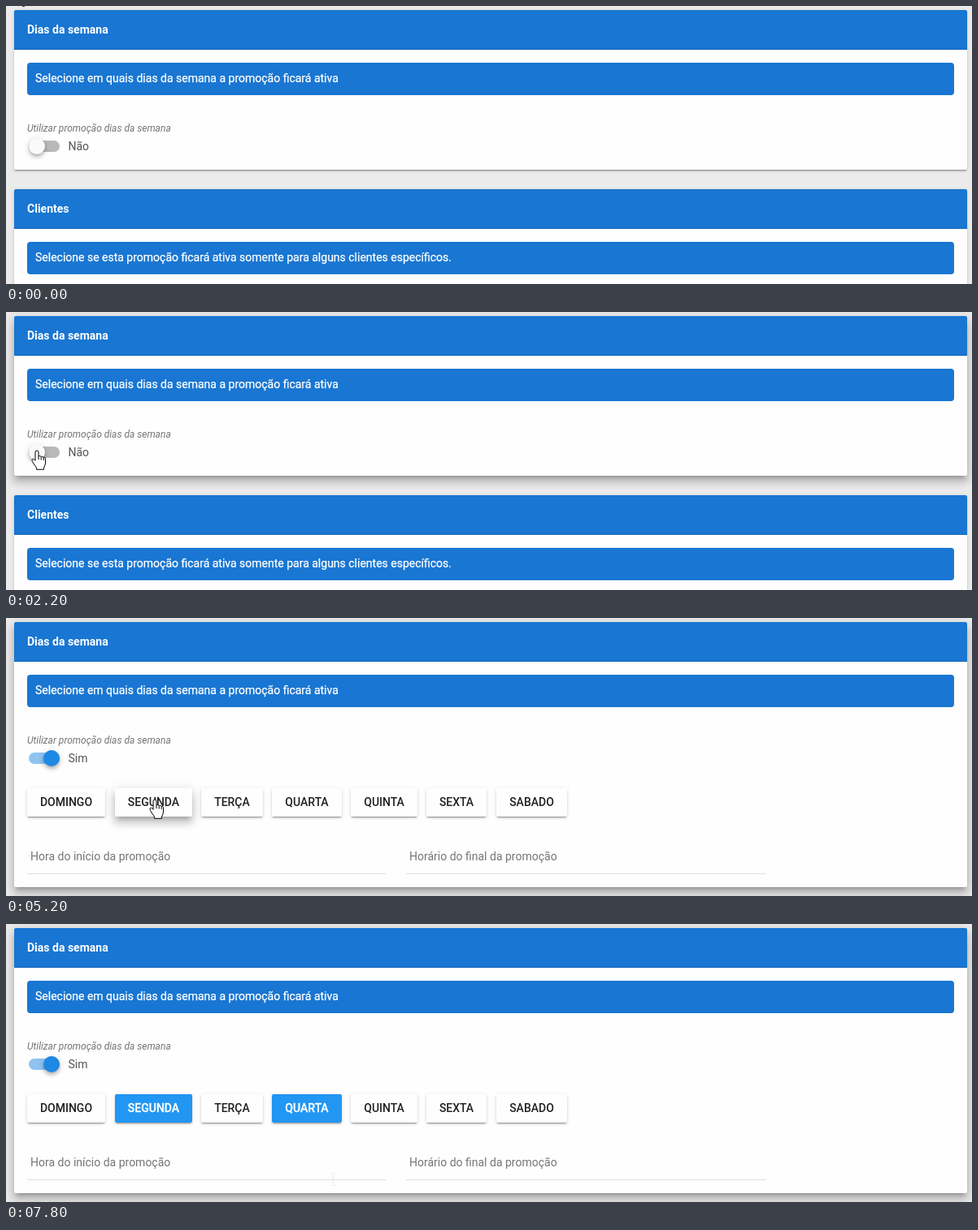
Write an HTML page that moves like this. It is 1188 px wide and 343 px high and loops after 8 s.

```html
<!DOCTYPE html>
<html lang="pt-BR">
<head>
<meta charset="utf-8">
<title>Dias da semana</title>
<style>
html, body { margin: 0; width: 100%; height: 100%; overflow: hidden; background: #ebebeb; }
#stage { position: relative; width: 1188px; height: 343px; overflow: hidden; background: #ebebeb; font: 14px/20px Roboto, Arial, sans-serif; color: #757575; }
#stage div, #stage span { position: absolute; white-space: nowrap; box-sizing: border-box; }
.card { left: 10px; width: 1172px; background: #fefefe; border-radius: 2px; }
.head { left: 0; top: 0; width: 100%; height: 49px; padding: 14px 16px; background: #1976d2; color: #fff; font-weight: 700; border-radius: 2px 2px 0 0; box-shadow: inset 0 -1px rgba(0,0,0,.12); }
.note { left: 16px; top: 65px; width: 1140px; height: 40px; padding: 9px 10px; background: #1976d2; color: #fff; border-radius: 4px; -webkit-text-stroke: .25px #fff; }
.hint { left: 16px; top: 136px; font-size: 12px; font-style: italic; }
.track { left: 18px; top: 161px; width: 38px; height: 14px; border-radius: 7px; }
.thumb { left: 18px; top: 158px; width: 20px; height: 20px; border-radius: 50%; box-shadow: 0 2px 4px -1px rgba(0,0,0,.2), 0 4px 5px rgba(0,0,0,.14), 0 1px 10px rgba(0,0,0,.12); }
.state { left: 66.5px; top: 158px; color: #555; }
.day { top: 205px; height: 35px; padding-top: 7px; border-radius: 2px; text-align: center; font-weight: 500; }
.line { top: 310px; height: 1px; background: #dedede; }
.field { top: 279px; }
#mark { left: 20px; top: 0; width: 3px; height: 1px; background: #444; }
svg { position: absolute; left: 0; top: 0; overflow: visible; }
svg g { fill: #fff; stroke: #000; stroke-width: 1; stroke-linejoin: round; }
</style>
</head>
<body>
<div id="stage">
  <div id="mark"></div>
  <div class="card" id="days" style="top:5px">
    <div class="head">Dias da semana</div>
    <div class="note">Selecione em quais dias da semana a promoção ficará ativa</div>
    <span class="hint">Utilizar promoção dias da semana</span>
    <div class="track"></div>
    <div class="thumb"></div>
    <span class="state"></span>
    <div id="more">
      <span class="field" style="left:20px">Hora do início da promoção</span>
      <span class="field" style="left:486px">Horário do final da promoção</span>
      <div class="line" style="left:16px;width:441px"></div>
      <div class="line" style="left:482px;width:442px"></div>
    </div>
  </div>
  <div class="card" id="clients" style="height:200px">
    <div class="head">Clientes</div>
    <div class="note">Selecione se esta promoção ficará ativa somente para alguns clientes específicos.</div>
  </div>
  <svg width="1188" height="343">
    <g id="arrow"><path d="M.5 .5V16.5L4.2 13 6.8 18.8 9.3 17.7 6.8 12H11.6Z"/></g>
    <g id="hand">
      <path d="M-2 2A2 2 0 0 1 2 2V7.5Q2 6.5 3.6 6.5 5 6.5 5.2 7.9 5.5 7.1 6.7 7.3 8.1 7.5 8.2 8.9 8.5 8.3 9.5 8.5 10.5 8.7 10.5 10.3V15Q10.5 17 9.5 19L8.5 21.2V23.3H-.5V21.2L-4 16Q-6 13-6 11.9-6 10.3-4.6 10.2-3.6 10.2-2 12.3Z"/>
      <path d="M2 7.5V11.2M5.2 8V11.5M8.2 9V12" fill="none"/>
    </g>
    <g id="beam"><path d="M-3-7.5H-1M1-7.5H3M0-6.5V6.5M-3 7.5H-1M1 7.5H3" style="fill:none;stroke:#e6e6e6"/></g>
  </svg>
</div>
<script>
const LOOP = 8000, OPEN = 2800;
const $ = q => document.querySelector(q);
const mix = (a, b, k) => a + (b - a) * k;
const ramp = (t, a, b) => {
  const k = Math.min(1, Math.max(0, (t - a) / (b - a)));
  return k * k * (3 - 2 * k);
};
const blend = (a, b, k) => `rgb(${a.map((v, i) => Math.round(mix(v, b[i], k)))})`;

// Elevations: y offset, blur and spread of three stacked shadows
const REST = [[3, 1, -2], [2, 2, 0], [1, 5, 0]];
const HOVER = [[2, 4, -1], [4, 5, 0], [1, 10, 0]];
const HIGH = [[5, 5, -3], [8, 10, 1], [3, 14, 2]];
const ALPHA = [.2, .14, .12];
const lift = (from, to, k) => from.map((s, i) =>
  `0 ${s.map((v, j) => mix(v, to[i][j], k) + 'px').join(' ')} rgba(0,0,0,${ALPHA[i]})`).join();

// Label, left, right, time of press
const days = [
  ['DOMINGO', 26, 122], ['SEGUNDA', 134, 229, 5200], ['TERÇA', 240, 316],
  ['QUARTA', 327, 413, 6800], ['QUINTA', 424, 506], ['SEXTA', 517, 591], ['SABADO', 603, 690]
].map(([text, left, right, press = Infinity]) => {
  const el = document.createElement('div');
  el.className = 'day';
  el.textContent = text;
  el.style.left = left - 10 + 'px';
  el.style.width = right - left + 'px';
  $('#more').append(el);
  return { el, left, right, press };
});

// Pointer: time, x, y
const path = [
  [800, 62, 2], [900, 54, 25], [1100, 43, 65], [1300, 39, 102], [1600, 38, 146],
  [1900, 37, 162], [2200, 38, 171], [4300, 38, 171], [4400, 57, 178], [4500, 84, 187],
  [4800, 158, 214], [5000, 183, 224], [5600, 183, 224], [5700, 184, 221], [5800, 186, 219],
  [5900, 212, 217], [6200, 325, 223], [6300, 341, 224], [6400, 341, 224], [6600, 334, 225],
  [7400, 334, 225], [7500, 343, 233], [7600, 374, 262], [7700, 400, 297], [7800, 402, 315]
];

function pointer(t) {
  const i = path.findIndex(p => p[0] > t);
  if (i < 0) return path[path.length - 1].slice(1);
  if (i === 0) return null;
  const [a, b] = [path[i - 1], path[i]];
  const k = (t - a[0]) / (b[0] - a[0]);
  return [Math.round(mix(a[1], b[1], k)), Math.round(mix(a[2], b[2], k))];
}

const overDay = (d, [x, y]) => y >= 210 && y <= 245 && x >= d.left && x <= d.right;

function shape(p, open) {
  const [x, y] = p;
  if (y > 305) return 'beam';
  const onSwitch = x >= 28 && x <= 66 && y >= 162 && y <= 184;
  return onSwitch || open && days.some(d => overDay(d, p)) ? 'hand' : 'arrow';
}

function render(t) {
  const open = t >= OPEN;
  $('#mark').hidden = t >= 200;
  $('#mark').style.display = t < 200 ? '' : 'none';

  $('#days').style.height = (open ? 327 : 197) + 'px';
  $('#days').style.boxShadow = lift(REST, HIGH, ramp(t, 800, 1100));
  $('#clients').style.top = (open ? 356 : 226) + 'px';
  $('#clients').style.boxShadow = lift(REST, REST, 0);
  $('#more').style.display = open ? '' : 'none';

  const on = ramp(t, 2670, 2900);
  $('.thumb').style.transform = `translateX(${open ? mix(0, 18, on) : 0}px)`;
  $('.thumb').style.background = blend([250, 250, 250], [30, 136, 229], open ? on : 0);
  $('.track').style.background = blend([185, 185, 185], [143, 195, 242], ramp(t, 2780, 3100));
  $('.state').textContent = open ? 'Sim' : 'Não';

  const p = pointer(t);
  for (const d of days) {
    const s = d.el.style;
    const k = ramp(t, d.press, d.press + 300);
    const held = t >= d.press && t < d.press + 300;
    const over = p && overDay(d, p);
    s.background = blend([254, 254, 254], [33, 150, 243], k);
    s.color = k > .2 ? '#fff' : '#212121';
    s.webkitTextStroke = k > .2 ? '.3px #fff' : '0';
    s.boxShadow = lift(REST, held ? HIGH : HOVER, over ? 1 : 0);
  }

  const kind = p && shape(p, open);
  for (const id of ['arrow', 'hand', 'beam']) {
    const g = $('#' + id);
    g.style.display = id === kind ? '' : 'none';
    if (id === kind) g.setAttribute('transform', `translate(${p})`);
  }
}

const start = performance.now();
function tick() {
  const t = (performance.now() - start) % LOOP;
  render(Math.floor(t / 100) * 100);
  requestAnimationFrame(tick);
}
tick();
</script>
</body>
</html>
```
